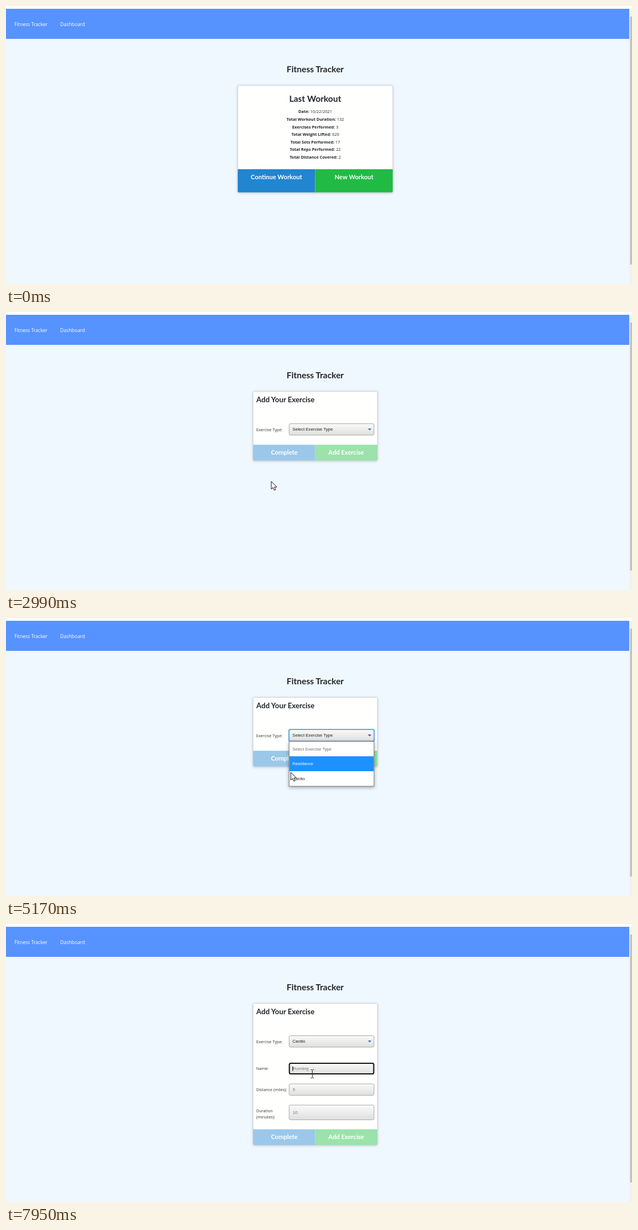
Write an HTML page that moves like this. It is 1121 by 499 pixels and loops after 8000 ms.

```html
<!DOCTYPE html>
<html lang="en">
<head>
<meta charset="utf-8">
<title>Fitness Tracker</title>
<style>
html, body { margin: 0; width: 100%; height: 100%; overflow: hidden; background: #f0f8ff }
svg { display: block; width: 100%; height: 100% }
text { font: 700 15.4px Lato, sans-serif; fill: #212529; white-space: pre }
.mid { text-anchor: middle }
.nav text { font: 8.6px "Open Sans", sans-serif; fill: #fff }
.stats text { font: 7.35px "Open Sans", sans-serif }
.stats tspan { font-weight: 700 }
.button { font-size: 11.1px; fill: #fff; text-anchor: middle }
.label { font: 7.25px "Open Sans", sans-serif; fill: #333 }
.value { font: 7.75px "Liberation Sans", Arial, sans-serif; fill: #222 }
.hint { font: 7.6px "Liberation Sans", Arial, sans-serif; fill: #777 }
.option { font: 7.5px "Liberation Sans", Arial, sans-serif; fill: #222 }
.card { fill: #fffffe; stroke: #d4d4d8; filter: drop-shadow(0 1px 2px #0003) }
.field { fill: url(#shade); stroke: #a9a9a9 }
</style>
</head>
<body>
<svg viewBox="0 0 1121 499" preserveAspectRatio="none">
  <defs>
    <linearGradient id="shade" x2="0" y2="1">
      <stop stop-color="#fafafa"/><stop offset="1" stop-color="#dfdfdf"/>
    </linearGradient>
  </defs>
  <rect width="1121" height="499" fill="#f0f8ff"/>
  <rect width="1121" height="5" fill="#fff"/>
  <g class="nav">
    <rect y="5" width="1116" height="54" fill="#5693ff"/>
    <text x="15" y="36">Fitness Tracker</text>
    <text x="97" y="36">Dashboard</text>
  </g>
  <rect x="1116" y="5" width="5" height="494" fill="#f1f1f1"/>
  <rect x="1117.5" y="19" width="3.5" height="445" fill="#c1c1c1"/>
  <text class="mid" x="553.7" y="119">Fitness Tracker</text>

  <g id="summary">
    <rect class="card" x="415" y="142.5" width="277.5" height="192" rx="2"/>
    <text class="mid" x="553.7" y="172.3">Last Workout</text>
    <g id="stats" class="stats mid"></g>
    <path id="resume" d="M415 293H553.5V334.5H417Q415 334.5 415 332.5Z"/>
    <path d="M553.5 293H692.5V332.5Q692.5 334.5 690.5 334.5H553.5Z" fill="#21ba45"/>
    <text class="button" x="484.3" y="310.8">Continue Workout</text>
    <text class="button" x="623.2" y="310.8">New Workout</text>
  </g>

  <g id="form">
    <rect id="formCard" class="card" x="442.5" y="142.5" width="222.5" rx="2"/>
    <text x="448.3" y="161.6" style="font-size:13.1px">Add Your Exercise</text>
    <text class="label" x="448" y="214">Exercise Type:</text>
    <rect class="field" x="507" y="200.5" width="152" height="20.5" rx="2.5"/>
    <rect id="typeFocus" x="506.5" y="200" width="153" height="21.5" rx="3" fill="none" stroke="#69a5ea" stroke-width="2"/>
    <text id="type" class="value" x="513" y="213.3"></text>
    <path id="arrow" d="M648 209h6.4l-3.2 3.8z"/>
    <g id="cardio">
      <text class="label" x="448" y="262.3">Name:</text>
      <text class="label" x="448" y="300.3">Distance (miles):</text>
      <text class="label" x="448" y="338.3">Duration</text>
      <text class="label" x="448" y="349">(minutes):</text>
      <rect class="field" x="507" y="249.5" width="152" height="20" rx="2.5"/>
      <rect class="field" x="507" y="287" width="152" height="20.5" rx="2.5"/>
      <rect class="field" x="507" y="325" width="152" height="26.5" rx="2.5"/>
      <text class="hint" x="513.5" y="262.3">Running</text>
      <text class="hint" x="513.5" y="300">5</text>
      <text class="hint" x="513.5" y="340.8">10</text>
      <path id="spinner" d="M646.6 296.8l2.3-2.8 2.3 2.8zM646.6 298.2l2.3 2.8 2.3-2.8z" fill="#333"/>
      <g id="nameFocus">
        <rect x="507.5" y="250" width="151" height="19" rx="2.5" fill="none" stroke="#101010" stroke-width="2"/>
        <path d="M513.5 255.5v8.5" stroke="#000"/>
      </g>
    </g>
    <g id="actions">
      <path d="M442.5 238.2H553.7V266.5H444.5Q442.5 266.5 442.5 264.5Z" fill="#9bc8e9"/>
      <path d="M553.7 238.2H665V264.5Q665 266.5 663 266.5H553.7Z" fill="#9be2ab"/>
      <text class="button" x="498.3" y="256">Complete</text>
      <text class="button" x="609.2" y="256">Add Exercise</text>
    </g>
    <g id="menu">
      <rect x="507" y="221.5" width="152" height="80.5" fill="#fff" stroke="#767676" style="filter:drop-shadow(0 2px 3px #0005)"/>
      <rect id="highlight" x="507.5" width="151" height="26.8" fill="#1e90ff"/>
      <text class="option" x="513" y="237.5" style="fill:#6d6d6d">Select Exercise Type</text>
      <text id="option0" class="option" x="513" y="264">Resistance</text>
      <text id="option1" class="option" x="513" y="290.7">Cardio</text>
    </g>
  </g>

  <path id="pointer" d="M0 0V14L3.2 11L5.5 16L7.8 15L5.6 10.2H10Z" fill="#fff" stroke="#111"/>
  <path id="beam" d="M-3-7.5H-1L0-6.5L1-7.5H3M0-6.5V6.5M-3 7.5H-1L0 6.5L1 7.5H3" fill="none" stroke="#222"/>
  <circle id="click" r="10" fill="#d2d728" fill-opacity=".7"/>
</svg>
<script>
const LOOP = 8000, STEP = 68;
const $ = id => document.getElementById(id);
const show = (id, on) => $(id).style.display = on ? "" : "none";
const place = (id, x, y) => $(id).setAttribute("transform", `translate(${x} ${y})`);

$("stats").innerHTML = [
  ["Date", "10/22/2021"], ["Total Workout Duration", 132], ["Exercises Performed", 3],
  ["Total Weight Lifted", 620], ["Total Sets Performed", 17],
  ["Total Reps Performed", 22], ["Total Distance Covered", 2]
].map(([name, value], i) =>
  `<text x="553.8" y="${192.2 + i * 13.65}"><tspan>${name}:</tspan> ${value}</text>`).join("");

// Mouse strokes as [time, x, y]; the pointer rests between strokes.
const strokes = [
  [[200, 1027, 468], [450, 760, 395], [700, 510, 315], [870, 475, 304]],
  [[3460, 485, 298], [3800, 597, 229], [4010, 598, 208]],
  [[4700, 596, 209], [5000, 545, 250], [5176, 510, 277], [5450, 522, 290]],
  [[5520, 526, 291], [5590, 529, 291]],
  [[5790, 530, 291]],
  [[6410, 531, 292]],
  [[6870, 534, 289], [7140, 547, 268]],
  [[7950, 548, 269]]
];
const clicks = [[1940, 2010], [4280, 4350], [6250, 6320], [7620, 7750]];

function mouseAt(t) {
  const stroke = strokes.findLast(s => s[0][0] <= t);
  if (!stroke) return null;
  const start = stroke[0][0];
  const time = start + Math.floor((t - start + 6) / STEP) * STEP;
  const i = stroke.findIndex(p => p[0] > time);
  if (i < 0) return stroke.at(-1).slice(1);
  const [t0, x0, y0] = stroke[i - 1], [t1, x1, y1] = stroke[i];
  const k = (time - t0) / (t1 - t0);
  return [Math.round(x0 + (x1 - x0) * k), Math.round(y0 + (y1 - y0) * k)];
}

function render(t) {
  const mouse = mouseAt(t), [x, y] = mouse || [0, 0];
  const onForm = t >= 2990, chosen = t >= 6320, typing = t >= 6410;
  const focused = t >= 4280 && t < 7690;

  show("summary", !onForm);
  show("form", onForm);
  const overResume = x >= 415 && x < 553 && y >= 293 && y < 335;
  $("resume").setAttribute("fill", overResume ? "#0d71bb" : "#2185d0");

  $("formCard").setAttribute("height", chosen ? 254 : 124);
  place("actions", 0, chosen ? 130.2 : 0);
  show("cardio", chosen);
  show("typeFocus", focused);
  $("type").textContent = chosen ? "Cardio" : "Select Exercise Type";
  $("arrow").setAttribute("fill", focused ? "#5c5c80" : "#4f7fae");
  show("spinner", typing && y >= 287);
  show("nameFocus", t >= 7690);

  const picked = t < 4700 || y < 248 ? -1 : t < 5240 ? 0 : 1;
  show("menu", t >= 4350 && !chosen);
  show("highlight", picked >= 0);
  $("highlight").setAttribute("y", picked ? 275 : 248.2);
  for (const i of [0, 1]) $("option" + i).style.fill = i === picked ? "#fff" : "";

  show("pointer", mouse && !typing);
  show("beam", typing);
  place("pointer", x, y);
  place("beam", x + .5, y);
  show("click", clicks.some(([from, to]) => t >= from && t < to));
  place("click", x - 1, y - .5);
}

function tick(now) {
  render(now % LOOP);
  requestAnimationFrame(tick);
}
tick(performance.now());
</script>
</body>
</html>
```
